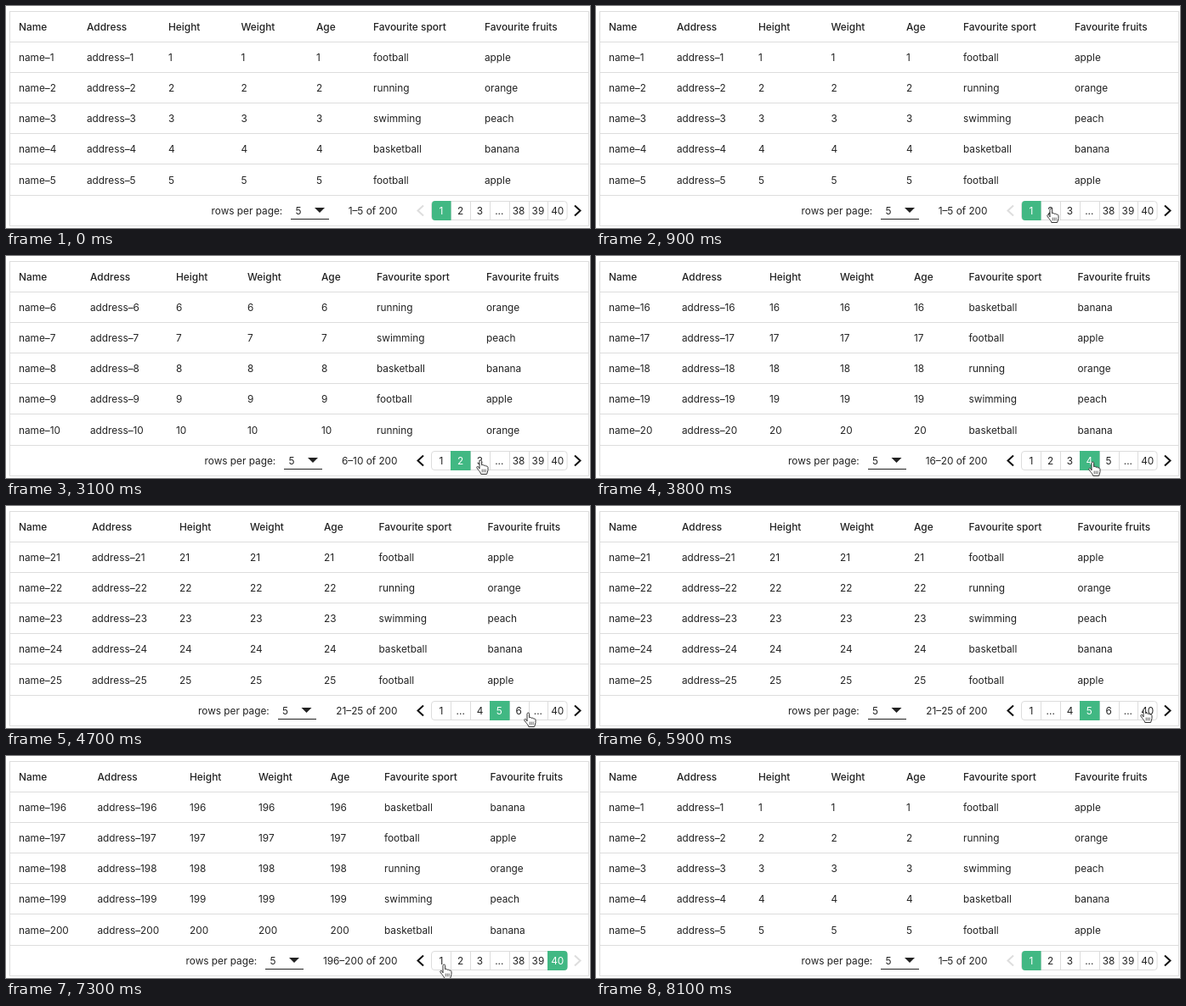
Write an HTML page that moves like this. It is 687 px wide and 262 px high and loops after 8.9 s.

```html
<!DOCTYPE html>
<html lang="en">
<head>
<meta charset="utf-8">
<title>Paginated table</title>
<style>
  html, body { margin: 0; width: 100%; height: 100%; overflow: hidden; background: #fff; }
  svg { display: block; font: 11.8px Inter, "Open Sans", sans-serif; fill: #222; }
  .head { font-weight: 500; font-size: 11.9px; }
  .line { fill: none; stroke: #ddd; }
  .chevron { fill: none; stroke: #111; stroke-width: 2; }
  .off { stroke: #ddd; }
  .active { fill: #41b883; }
</style>
</head>
<body>
<svg id="stage" width="687" height="262" viewBox="0 0 687 262">
  <g id="table"></g>
  <g id="cursor" stroke-linejoin="round" stroke-linecap="round">
    <path fill="#fff" stroke="#333" d="M4 10.5V2.3C4 .6 6.6 .6 6.6 2.3V6.8C7.4 6.1 9 6.4 9.2 7.4C10 6.8 11.5 7.1 11.7 8.2C12.6 7.7 14 8.2 14 9.6V12.5C14 14.5 12.8 15.5 12.6 17.5H5.8C5.6 15.6 3.6 14 2.6 12.4L.9 10C.2 8.7 1.7 7.8 2.7 8.8Z"/>
    <path fill="none" stroke="#444" stroke-width=".8" d="M7.2 12v3M9.2 12v3M11.2 12v3"/>
  </g>
</svg>
<script>
const LOOP = 8900, STEP = 100, PER_PAGE = 5, TOTAL = 200, LAST = TOTAL / PER_PAGE;
const HEADERS = ["Name", "Address", "Height", "Weight", "Age", "Favourite sport", "Favourite fruits"];
const SPORTS = ["football", "running", "swimming", "basketball"];
const FRUITS = ["apple", "orange", "peach", "banana"];
const RULES = [42.5, 78.5, 114.5, 150.5, 186.5, 223.5];

// Column positions follow the widest number on the page.
const NARROW = [15, 95, 191, 276.5, 365, 432, 563];
const MEDIUM = [15, 99, 200, 284, 371, 436, 565];
const WIDE = [15, 101, 204, 287, 374, 438.5, 566.5];
const WIDEST = [15, 107.5, 216, 297, 381.5, 445, 569.5];
const PAGES = {
  1: { columns: NARROW, range: 400.5 },
  2: { columns: MEDIUM, range: 392.5 },
  3: { columns: MEDIUM, range: 389.5 },
  4: { columns: WIDE, range: 385 },
  5: { columns: WIDE, range: 385 },
  [LAST]: { columns: WIDEST, range: 370.5 }
};

// [time, page]
const CLICKS = [[0, 1], [1300, 2], [3300, 3], [3800, 4], [4600, 5], [6300, LAST], [7600, 1]];

// [time of first step, number of steps, x, y]
const SHOW = 200, HIDE = 8100;
const MOVES = [
  [200, 5, 528, 238], [900, 1, 530, 238], [1600, 2, 562, 244],
  [2200, 1, 619, 239.5], [2300, 2, 632, 241], [2500, 2, 618, 240],
  [2900, 3, 553, 240], [3400, 2, 579, 242], [3900, 3, 598, 243],
  [4700, 3, 631, 243], [5300, 3, 636, 242], [5700, 1, 638, 240],
  [5900, 1, 640, 238], [6500, 2, 650, 244], [6800, 2, 512, 246],
  [7100, 3, 510, 245], [7600, 2, 510, 243]
];

const table = document.getElementById("table");
const cursor = document.getElementById("cursor");

const text = (x, y, value, attrs = "") => `<text x="${x}" y="${y}" ${attrs}>${value}</text>`;
const path = (d, kind) => `<path class="${kind}" d="${d}"/>`;

function pageItems(page) {
  if (page < 3 || page > LAST - 2) return [1, 2, 3, "...", LAST - 2, LAST - 1, LAST];
  if (page === 3) return [1, 2, 3, 4, "...", LAST - 1, LAST];
  if (page === 4) return [1, 2, 3, 4, 5, "...", LAST];
  return [1, "...", page - 1, page, page + 1, "...", LAST];
}

function rows(page, columns) {
  let out = HEADERS.map((label, c) => text(columns[c], 29.2, label, 'class="head"')).join("");
  for (let r = 0; r < PER_PAGE; r++) {
    const n = (page - 1) * PER_PAGE + r + 1, kind = (n - 1) % 4;
    const cells = [`name–${n}`, `address–${n}`, n, n, n, SPORTS[kind], FRUITS[kind]];
    const y = r === 4 ? 210 : 65.2 + r * 36;
    out += cells.map((value, c) => text(columns[c], y, value)).join("");
  }
  return out;
}

function pager(page) {
  const left = 500.5, width = 22.8, right = left + 7 * width;
  const items = pageItems(page);
  let out = `<rect class="line" x="${left}" y="230.5" width="${7 * width}" height="22" rx="3.5"/>`;
  for (let i = 1; i < 7; i++) out += path(`M${Math.round(left + i * width) + 0.5} 231V252`, "line");
  items.forEach((item, i) => {
    const x = left + i * width;
    const active = item === page;
    if (active) {
      const a = Math.round(x), b = Math.round(x + width) + 0.5;
      const l = i === 0 ? 4 : 0, r = i === 6 ? 4 : 0;
      out += path(`M${a + l} 230H${b - r}q${r} 0 ${r} ${r}V${253 - r}q0 ${r} ${-r} ${r}H${a + l}q${-l} 0 ${-l} ${-l}V${230 + l}q0 ${-l} ${l} ${-l}Z`, "active");
    }
    out += text(x + width / 2, 245.6, item, `text-anchor="middle"${active ? ' fill="#fff"' : ""}`);
  });
  out += path("M491 235.5L484.5 241.5L491 247.5", "chevron" + (page === 1 ? " off" : ""));
  out += path(`M${right + 8.9} 235.5L${right + 15.4} 241.5L${right + 8.9} 247.5`, "chevron" + (page === LAST ? " off" : ""));
  return out;
}

function footer(page, x) {
  const first = (page - 1) * PER_PAGE + 1;
  return text(x - 75.3, 245.6, "rows per page:", 'text-anchor="end"')
    + text(x - 60, 245.6, PER_PAGE)
    + path(`M${x - 37.5} 238h12l-6 6Z`, "arrow")
    + `<rect x="${Math.round(x - 65.5)}" y="251" width="45" height="1"/>`
    + text(460.5, 245.6, `${first}–${first + PER_PAGE - 1} of ${TOTAL}`, 'text-anchor="end"');
}

let shownPage = 0;
function drawPage(page) {
  if (page === shownPage) return;
  shownPage = page;
  const { columns, range } = PAGES[page];
  table.innerHTML = '<rect class="line" x="4.5" y="6.5" width="681" height="253"/>'
    + RULES.map(y => path(`M5 ${y}H685`, "line")).join("")
    + rows(page, columns) + footer(page, range) + pager(page);
}

function cursorAt(t) {
  let x = 513, y = 256;
  for (const [start, steps, tx, ty] of MOVES) {
    if (t < start) break;
    const p = Math.min(1, (Math.floor((t - start) / STEP) + 1) / steps);
    x += (tx - x) * p;
    y += (ty - y) * p;
  }
  return [x, y];
}

function render(t) {
  drawPage(CLICKS.filter(([time]) => time <= t).pop()[1]);
  cursor.setAttribute("visibility", t >= SHOW && t < HIDE ? "visible" : "hidden");
  cursor.setAttribute("transform", `translate(${cursorAt(t)})`);
}

const began = performance.now();
function tick() {
  render((performance.now() - began) % LOOP);
  requestAnimationFrame(tick);
}
tick();
</script>
</body>
</html>
```
